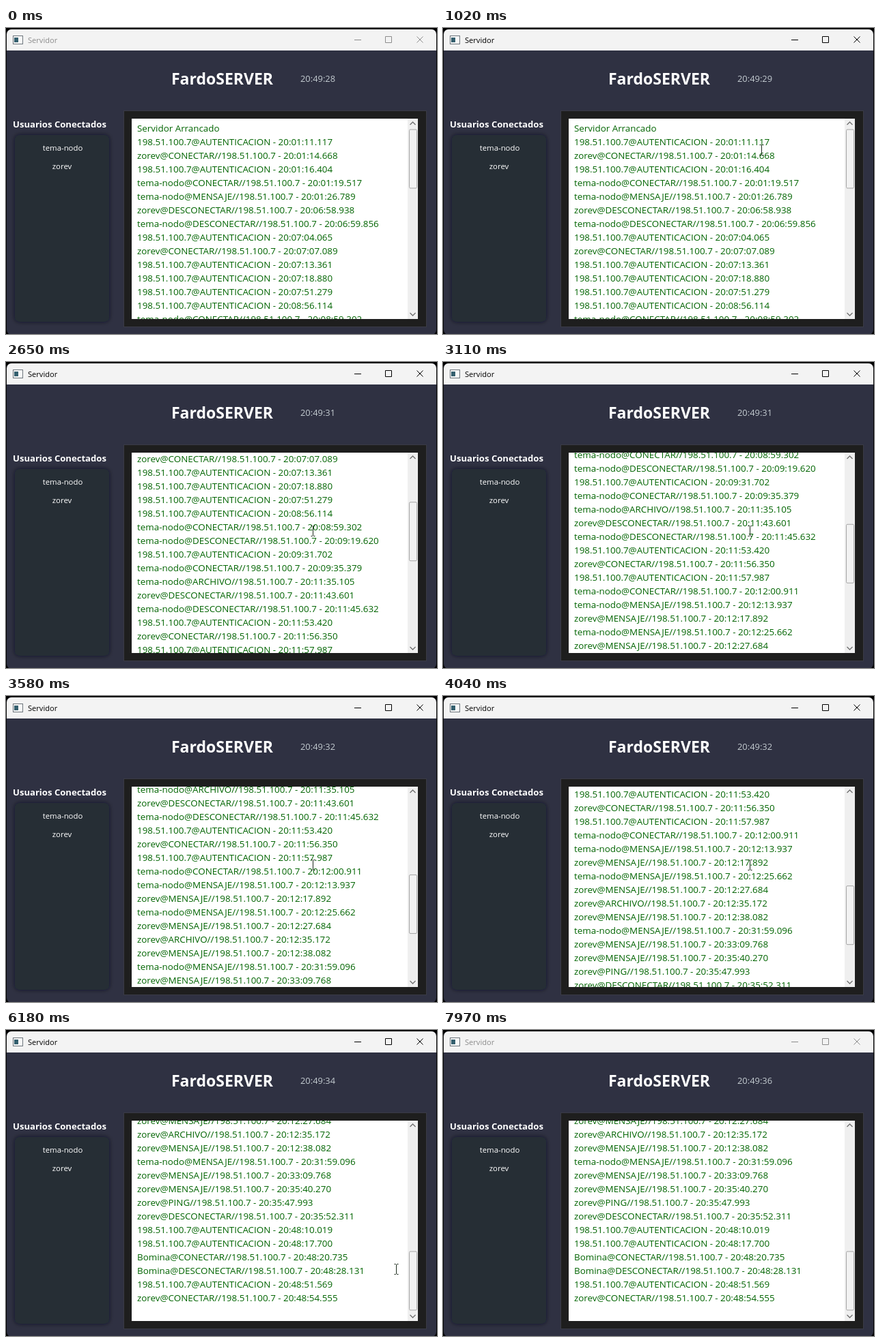
Animation of 631x449 px, one loop 8000 ms. Source, as an HTML page:

```html
<!DOCTYPE html>
<html lang="es">
<head>
<meta charset="utf-8">
<title>Servidor</title>
<style>
  html, body { margin: 0; width: 100%; height: 100%; overflow: hidden; background: #000; }
  svg { display: block; }
  text { font-family: "Open Sans", "Noto Sans", sans-serif; white-space: pre; }
  .bold { font-weight: 700; fill: #fff; }
  .user { font-size: 11.4px; fill: #fff; text-anchor: middle; }
  #log text { font-size: 13.4px; fill: #006400; }
  .line { fill: none; stroke: #707070; }
  #bar { color: #8c8c8c; }
  #bar.active { color: #000; }
</style>
</head>
<body>
<svg width="631" height="449" viewBox="0 0 631 449">
  <defs>
    <filter id="soft" x="-10%" y="-10%" width="120%" height="120%">
      <feDropShadow dx="0" dy="0" stdDeviation="3" flood-color="#15181f" flood-opacity=".7"/>
    </filter>
  </defs>
  <rect x="1" y="2" width="629" height="448" rx="7" fill="#2f3142"/>

  <g id="bar">
    <path d="M1 33V9a7 7 0 0 1 7-7H623a7 7 0 0 1 7 7V33Z" fill="#f3f3f3"/>
    <rect x="10.5" y="11.5" width="14" height="12" fill="#fafafa" stroke="#6d757c"/>
    <rect x="12" y="14" width="6" height="7" fill="#35606f"/>
    <text x="32" y="22" font-size="11.1" fill="currentColor">Servidor</text>
    <path d="M510 17.5h10M555.5 12.5h9v9h-9zM601.5 12.5l9 9m0-9l-9 9" fill="none" stroke="currentColor"/>
  </g>

  <text class="bold" x="242" y="83" font-size="23">FardoSERVER</text>
  <text id="clock" x="431" y="79" font-size="12.9" fill="#c3cbd0"></text>

  <text class="bold" x="10" y="146" font-size="13.1">Usuarios Conectados</text>
  <rect x="13" y="157" width="138" height="274" rx="7" fill="#252f34" filter="url(#soft)"/>
  <text class="user" x="83" y="180">tema-nodo</text>
  <text class="user" x="82" y="207">zorev</text>

  <rect x="172.5" y="121.5" width="443" height="317" fill="#1e1e1e" stroke="#3a3b45"/>
  <rect x="184" y="133" width="419" height="294" fill="#fff"/>
  <svg x="184" y="133" width="404" height="294" overflow="hidden"><g id="log"></g></svg>

  <rect x="588" y="133" width="15" height="294" fill="#efefef"/>
  <path class="line" d="M591.5 142l4-4 4 4M591.5 418l4 4 4-4" stroke-width="1.3"/>
  <rect id="thumb" x="590.5" y="149" width="11" height="86" rx="1.5" fill="#f2f2f2" stroke="#a6a6a6"/>

  <path id="cursor" d="M-3-7.5H-1L0-6.5 1-7.5H3M0-7V7M-3 7.5H-1L0 6.5 1 7.5H3" fill="none" stroke="#1c2b1c"/>
</svg>

<script>
const LOOP = 8000, LINE = 20, NOTCH = 26.45, MAX_SCROLL = 574;
const names = { i: "198.51.100.7", u: "tema-nodo", z: "zorev", b: "Bomina" };
const verbs = { C: "CONECTAR", D: "DESCONECTAR", M: "MENSAJE", F: "ARCHIVO", P: "PING" };
const entries = `i 01:11.117|zC 01:14.668|i 01:16.404|uC 01:19.517|uM 01:26.789|zD 06:58.938|uD 06:59.856
i 07:04.065|zC 07:07.089|i 07:13.361|i 07:18.880|i 07:51.279|i 08:56.114|uC 08:59.302|uD 09:19.620
i 09:31.702|uC 09:35.379|uF 11:35.105|zD 11:43.601|uD 11:45.632|i 11:53.420|zC 11:56.350|i 11:57.987
uC 12:00.911|uM 12:13.937|zM 12:17.892|uM 12:25.662|zM 12:27.684|zF 12:35.172|zM 12:38.082|uM 31:59.096
zM 33:09.768|zM 35:40.270|zP 35:47.993|zD 35:52.311|i 48:10.019|i 48:17.700|bC 48:20.735|bD 48:28.131
i 48:51.569|zC 48:54.555`.split(/[|\n]/);

const ticks = [500, 1500, 2510, 3510, 4500, 5430, 6440, 7440];
const notches = [1580, 1710, 1840, 2040, 2180, 2310, 2650, 2710, 2780, 2910, 3110,
  3180, 3310, 3580, 3780, 4040, 4370, 4570, 4830, 5030, 5360, 5630];
// Pointer path: time, x, y
const path = [[70, 558, 415], [210, 390, 201], [470, 390, 201], [1160, 485, 174], [1840, 485, 174],
  [2040, 449, 248], [5850, 449, 248], [6180, 571, 351], [7200, 571, 351], [7440, 579, 417]];

const $ = id => document.getElementById(id);
const passed = (times, t) => times.filter(x => x <= t).length;

function describe(entry) {
  const [code, time] = entry.split(" ");
  const action = code === "i" ? "AUTENTICACION" : `${verbs[code[1]]}//${names.i}`;
  return `${names[code[0]]}@${action} - 20:${time}`;
}

["Servidor Arrancado", ...entries.map(describe)].forEach((line, i) => {
  const text = document.createElementNS("http://www.w3.org/2000/svg", "text");
  text.setAttribute("x", 8);
  text.setAttribute("y", 19 + i * LINE);
  text.textContent = line;
  $("log").append(text);
});

function pointerAt(t) {
  const k = path.findIndex(p => p[0] > t);
  if (k < 1) return null;
  const [t0, x0, y0] = path[k - 1], [t1, x1, y1] = path[k];
  const f = (t - t0) / (t1 - t0);
  return [x0 + (x1 - x0) * f, y0 + (y1 - y0) * f].map(Math.round);
}

function draw(now) {
  const t = now % LOOP;
  const scroll = Math.round(Math.min(MAX_SCROLL, passed(notches, t) * NOTCH));
  $("log").setAttribute("transform", `translate(0 ${-scroll})`);
  $("thumb").setAttribute("y", 149 + scroll * 176 / MAX_SCROLL);
  $("clock").textContent = `20:49:${28 + passed(ticks, t)}`;
  $("bar").classList.toggle("active", t >= 700 && t < 7970);

  const pointer = pointerAt(t);
  $("cursor").style.display = pointer ? "" : "none";
  if (pointer) $("cursor").setAttribute("transform", `translate(${pointer[0] + .5} ${pointer[1]})`);
}

const start = performance.now();
(function frame() {
  draw(performance.now() - start);
  requestAnimationFrame(frame);
})();
</script>
</body>
</html>
```
